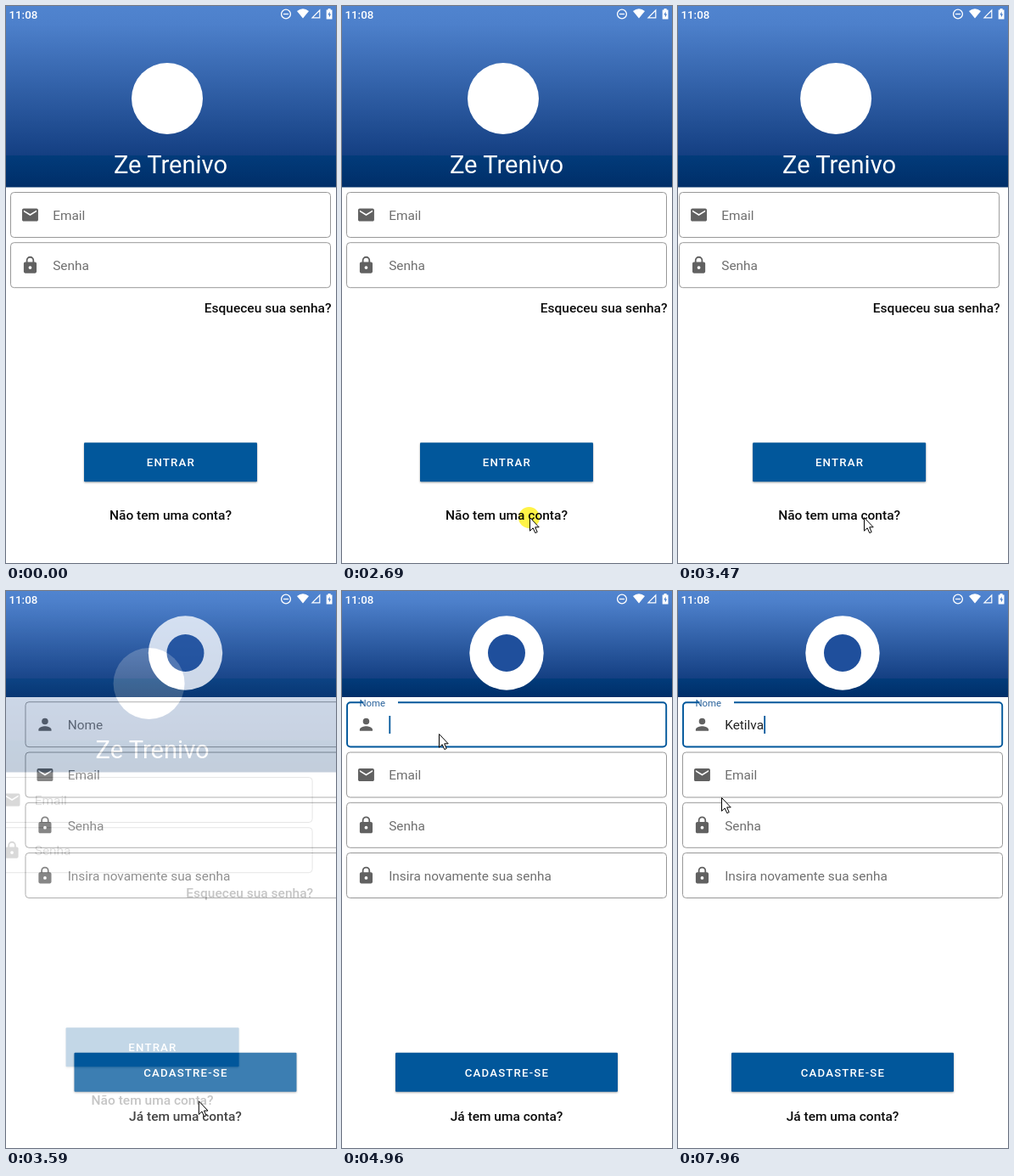
Animation, 389 px wide and 656 px high, one loop 8 s. Source, as an HTML page:

```html
<!DOCTYPE html>
<html lang="pt-BR">
<head>
<meta charset="utf-8">
<title>Cadastro</title>
<style>
html, body { margin: 0; width: 100%; height: 100%; overflow: hidden; background: #fff; }
svg { display: block; width: 389px; height: 656px; font: 15.4px Roboto, "Open Sans", sans-serif; }
.hint { fill: #6f6f6f; }
.icon { fill: #616161; }
.box { fill: none; stroke: #989898; }
.link { font-size: 15.5px; font-weight: 500; fill: #0b0b0b; }
.btn rect { fill: #01579b; filter: drop-shadow(0 1.5px 1.2px rgba(0, 0, 0, .35)); }
.btn text { fill: #fff; font-size: 13.25px; font-weight: 500; letter-spacing: 1.18px; text-anchor: middle; }
.title { fill: #fff; font-size: 29.1px; text-anchor: middle; }
.clock { fill: #fff; font-size: 13.3px; font-weight: 500; }
#click { mix-blend-mode: multiply; }
</style>
</head>
<body>
<svg viewBox="0 0 389 656">
  <defs>
    <linearGradient id="sky" x1="0" y1="0" x2="0" y2="1">
      <stop offset="0" stop-color="#5084cf"/>
      <stop offset=".1" stop-color="#4d80cb"/>
      <stop offset=".825" stop-color="#143f82"/>
      <stop offset=".826" stop-color="#023b7a"/>
      <stop offset="1" stop-color="#002e68"/>
    </linearGradient>
    <path id="mail" d="M20 4H4c-1.1 0-2 .9-2 2v12c0 1.1.9 2 2 2h16c1.1 0 2-.9 2-2V6c0-1.1-.9-2-2-2zm0 4l-8 5-8-5V6l8 5 8-5z"/>
    <path id="lock" d="M18 8h-1V6A5 5 0 0 0 7 6v2H6c-1.1 0-2 .9-2 2v10c0 1.1.9 2 2 2h12c1.1 0 2-.9 2-2V10c0-1.1-.9-2-2-2zm-6 9a2 2 0 1 1 0-4 2 2 0 0 1 0 4zm3.1-9H8.9V6a3.1 3.1 0 0 1 6.2 0z"/>
    <path id="person" d="M12 12a4 4 0 1 0 0-8 4 4 0 0 0 0 8zm0 2c-2.67 0-8 1.34-8 4v2h16v-2c0-2.66-5.33-4-8-4z"/>
  </defs>

  <g id="login">
    <rect x="-60" width="510" height="656" fill="#fff"/>
    <rect x="-60" width="510" height="213.5" fill="url(#sky)"/>
    <circle cx="190" cy="109" r="42" fill="#fff"/>
    <text class="title" x="194" y="197">Ze Trenivo</text>
    <text class="link" x="383.5" y="360.5" text-anchor="end">Esqueceu sua senha?</text>
    <text class="link" id="join" x="194" y="605" text-anchor="middle">Não tem uma conta?</text>
  </g>

  <g id="signup">
    <rect x="-60" width="510" height="656" fill="#fff"/>
    <rect x="-60" width="510" height="125" fill="url(#sky)"/>
    <circle cx="194" cy="73" r="43.7" fill="#fff"/>
    <circle cx="194" cy="73" r="22" fill="#1f4f9c"/>
    <text class="link" x="194" y="624" text-anchor="middle">Já tem uma conta?</text>
  </g>

  <g fill="none" stroke="#fff" stroke-width="1.3">
    <text class="clock" x="3.5" y="14.6" stroke="none">11:08</text>
    <circle cx="330" cy="9.5" r="5.4"/>
    <path d="M327 9.5h6"/>
    <path d="M350 14.6L343 6Q350 .6 357 6Z" fill="#fff" stroke="none"/>
    <path d="M369.8 5v8.8H361Z" stroke-width="1.2"/>
    <path d="M379.6 3h3v1.4h1.9v11h-6.8v-11h1.9z" fill="#fff" stroke="none"/>
    <path d="M381.6 6.4l-2.2 4h1.5v3l2.2-4h-1.5z" fill="#4d80cb" stroke="none"/>
  </g>

  <circle id="click" fill="#ffee00" stroke="#ffee00"/>
  <path id="mouse" d="M.5.5V16.2L4.2 12.8 6.8 18.6 9.2 17.5 6.7 11.8H11.2Z" fill="#fff" stroke="#000"/>
</svg>

<script>
const LOOP = 8000;
const LEFT = 55.2;
const $ = id => document.getElementById(id);

function add(parent, tag, attrs, text = "") {
  const el = document.createElementNS("http://www.w3.org/2000/svg", tag);
  for (const k in attrs) el.setAttribute(k, attrs[k]);
  el.textContent = text;
  parent.append(el);
  return el;
}

function field(page, y, icon, label) {
  const box = add(page, "rect", { class: "box", x: 5.5, y, width: 377, height: 53, rx: 4 });
  const mark = add(page, "use", { class: "icon", href: "#" + icon, transform: `translate(17.1 ${y + 15.2}) scale(.946)` });
  const hint = add(page, "text", { class: "hint", x: LEFT, y: y + 32.2 }, label);
  return { box, mark, hint };
}

function button(page, x, y, w, h, label) {
  const g = add(page, "g", { class: "btn" });
  add(g, "rect", { x, y, width: w, height: h, rx: 1 });
  add(g, "text", { x: x + w / 2 + .4, y: y + h / 2 + 5 }, label);
}

const login = $("login"), signup = $("signup");
field(login, 219.5, "mail", "Email");
field(login, 278.7, "lock", "Senha");
button(login, 92, 514.3, 204, 46, "ENTRAR");

const first = field(signup, 130.7, "person", "Nome");
field(signup, 190, "mail", "Email");
field(signup, 249.3, "lock", "Senha");
field(signup, 308.5, "lock", "Insira novamente sua senha");
button(signup, 63, 543.7, 262, 46, "CADASTRE-SE");

// Focused outline, open where the floating label sits
const focus = add(signup, "path", {
  d: "M66 131.2H378.2a4 4 0 0 1 4 4V179.5a4 4 0 0 1-4 4H10a4 4 0 0 1-4-4V135.2a4 4 0 0 1 4-4H25.5",
  fill: "none", stroke: "#01579b", "stroke-width": 1.9
});
const typed = add(signup, "text", { x: LEFT, y: 163.4, fill: "#222" });
const caret = add(signup, "rect", { y: 147, width: 1.8, height: 21, fill: "#01579b" });

// Rows are [time, ...values]
const path = [
  [210, 361, 631], [430, 335, 560], [620, 250, 440], [720, 208, 415], [860, 216, 450],
  [1010, 249, 520], [1080, 249, 526], [1250, 240, 575], [1430, 221, 602],
  [3460, 221, 602], [3470, 219, 602], [3525, 219, 602], [3600, 228, 600],
  [3730, 248, 584], [3795, 248, 584], [3870, 258, 510], [4080, 232, 340],
  [4220, 188, 215], [4290, 165, 195], [4480, 114, 168],
  [7750, 114, 168], [7820, 80, 195], [7890, 44, 238], [7960, 51, 243]
];
const slide = [[3469, 0], [3470, .1], [3525, .1], [3600, .62], [3660, .82], [3730, .9], [3795, .9], [3870, .95], [4010, .985], [4220, 1]];
const fade = [[3525, 0], [3610, 1]];
const dim = [[2820, 1], [2900, .35], [3050, .35], [3270, 1]];
const rise = [[4640, 0], [4800, 1]];
const keys = [5290, 5560, 5760, 6030, 6160, 6360, 6690];
const clicks = [[2690, 220.5, 602.5], [4560, 114, 168]];
const name = "Ketilva";

function at(rows, t) {
  if (t <= rows[0][0]) return rows[0].slice(1);
  const i = rows.findIndex(r => r[0] > t);
  if (i < 0) return rows[rows.length - 1].slice(1);
  const a = rows[i - 1], b = rows[i], k = (t - a[0]) / (b[0] - a[0]);
  return a.slice(1).map((v, n) => v + (b[n + 1] - v) * k);
}

function set(el, attrs) {
  for (const k in attrs) el.setAttribute(k, attrs[k]);
}

function drawClick(t) {
  const hit = clicks.find(c => t >= c[0] && t < c[0] + 400 + (c[0] < 3000 ? 180 : 0));
  if (!hit) return set($("click"), { opacity: 0 });
  const age = t - hit[0], k = Math.max(0, Math.min(1, (age - 200) / 200));
  set($("click"), {
    cx: hit[1], cy: hit[2], r: 12.5 + 27 * k,
    "fill-opacity": k > 0 ? 0 : 1, "stroke-width": k > 0 ? 3 * (1 - k) : 0,
    opacity: .72 * (1 - k)
  });
}

function drawName(t) {
  const [k] = at(rise, t), on = t >= 4640;
  const e = k * k * (3 - 2 * k);
  set(first.box, { opacity: on ? 0 : 1 });
  set(focus, { opacity: on ? 1 : 0 });
  set(first.hint, { x: LEFT - 34.8 * e, y: 162.9 - 26.9 * e });
  first.hint.style.fontSize = 15.4 - 4 * e + "px";
  first.hint.style.fill = on ? "#2a639c" : "";

  typed.textContent = name.slice(0, keys.filter(x => x <= t).length);
  const blink = t >= 7160 && t < 7620;
  set(caret, {
    x: LEFT + .2 + (typed.textContent ? typed.getComputedTextLength() : 0),
    opacity: t >= 4800 && !blink ? 1 : 0
  });
}

function draw(t) {
  const [p] = at(slide, t), [alpha] = at(fade, t), [x, y] = at(path, t);
  set(login, { transform: `translate(${-38.9 * p} 0)` });
  set(signup, { transform: `translate(${38.9 * (1 - p)} 0)`, opacity: alpha });
  set($("join"), { opacity: at(dim, t)[0] });
  set($("mouse"), { transform: `translate(${x} ${y})`, opacity: t < 210 ? 0 : 1 });
  drawClick(t);
  drawName(t);
}

let start;
function tick(now) {
  start ??= now;
  draw((now - start) % LOOP);
  requestAnimationFrame(tick);
}
draw(0);
requestAnimationFrame(tick);
</script>
</body>
</html>
```
